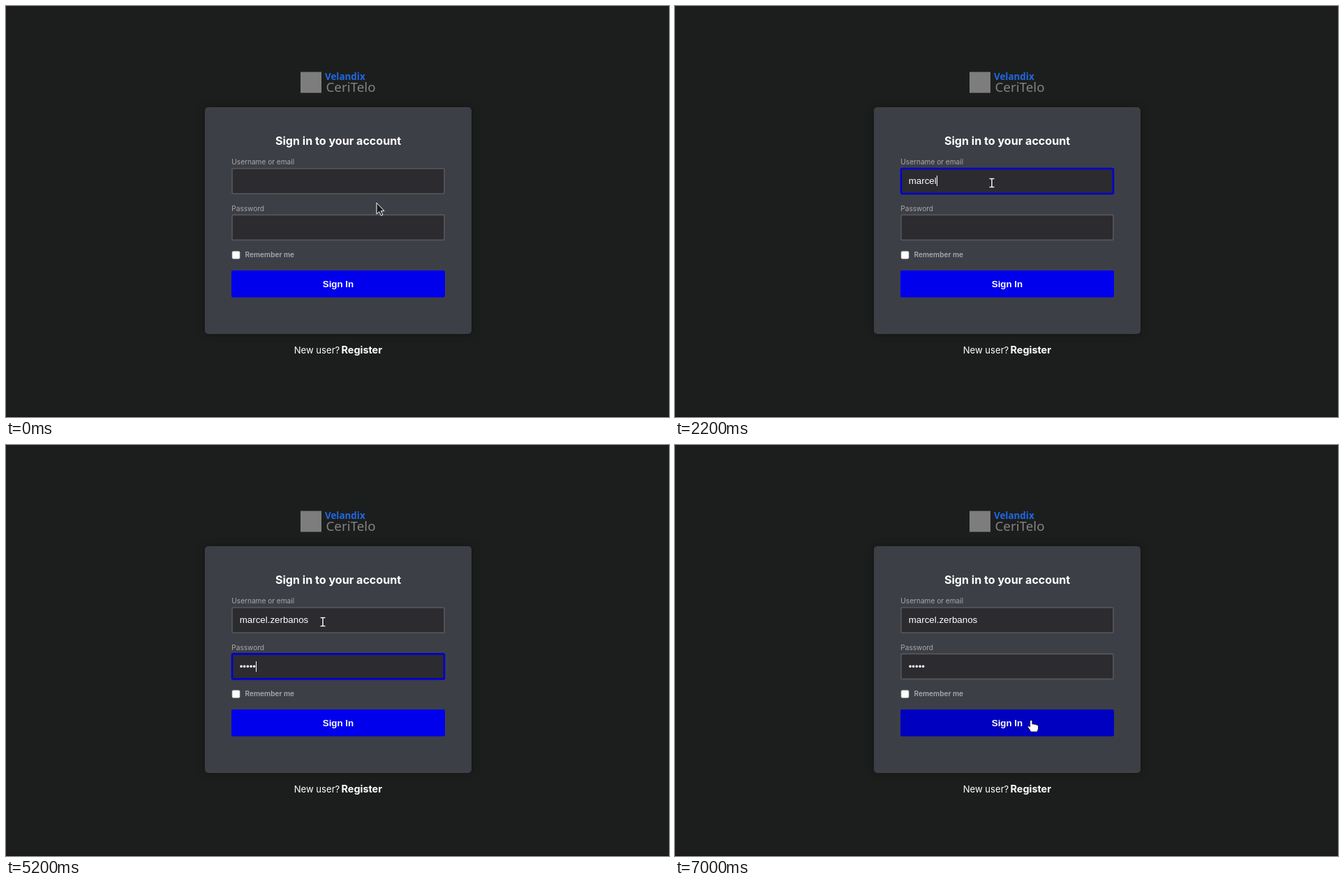
Write an HTML page that moves like this. It is 950 px wide and 589 px high and loops after 8000 ms.

```html
<!DOCTYPE html>
<html lang="en">
<head>
<meta charset="utf-8">
<title>Sign in</title>
<style>
  html, body { margin: 0; width: 100%; height: 100%; overflow: hidden; background: #1c1e1d; }
  svg { display: block; }
  text { font-family: Inter, sans-serif; fill: #fff; white-space: pre; }
  .label { font-size: 10.1px; fill: #a9a9ab; }
  .value, .button { font-family: "Liberation Sans", Arial, sans-serif; font-size: 13.333px; }
  .brand { font-family: "Noto Sans", sans-serif; }
  .bold { font-weight: 700; }
  .field { fill: #2b2b30; stroke: #58585a; stroke-width: 1.6; }
  .field.focus { stroke: #0000d2; stroke-width: 2.6; }
  .card { filter: drop-shadow(0 0 6px rgba(0, 0, 0, .28)); }
</style>
</head>
<body>
<svg width="950" height="589" viewBox="0 0 950 589">
  <rect width="950" height="589" fill="#1c1e1d"/>
  <rect y="588" width="950" height="1" fill="#121313"/>

  <rect x="422" y="94.5" width="30" height="30" fill="#7d7d7d"/>
  <text class="brand bold" x="457" y="106" font-size="13.4" style="fill:#1f68e4">Velandix</text>
  <text class="brand" x="458.5" y="122.8" font-size="18.8" style="fill:#828282">CeriTelo</text>

  <rect class="card" x="285" y="145" width="382" height="325" rx="5" fill="#3d3f46"/>
  <text class="bold" x="476" y="198.5" font-size="16.1" text-anchor="middle">Sign in to your account</text>

  <text class="label" x="323.3" y="227">Username or email</text>
  <rect class="field" id="userBox" x="324" y="233" width="304" height="36" rx="1.5"/>
  <text class="value" id="user" x="334.7" y="255.3"></text>

  <text class="label" x="323.3" y="293.6">Password</text>
  <rect class="field" id="passBox" x="324" y="299.4" width="304" height="36" rx="1.5"/>
  <text class="value" id="pass" x="334.7" y="321.8"></text>

  <rect id="caret" width="1" height="15" fill="#fff"/>

  <rect x="323.9" y="351.3" width="11.3" height="11.3" rx="2" fill="#fff" stroke="#767676" stroke-width=".6"/>
  <text class="label" x="342.6" y="360.3" style="font-weight:600;font-size:10.1px">Remember me</text>

  <rect id="button" x="323" y="379" width="306" height="38.5" rx="2"/>
  <text class="button bold" x="476" y="403" text-anchor="middle">Sign In</text>

  <text x="412.7" y="497.6" font-size="13.1">New user?</text>
  <text class="bold" x="480.6" y="497.6" font-size="14.4">Register</text>

  <!-- pointers, each drawn around its hot spot -->
  <g id="arrow">
    <path d="M0 0V16.2L3.8 12.8L6.4 18.4L8.9 17.3L6.4 11.7H11Z" fill="#1b1b1d" stroke="#fff"/>
  </g>
  <g id="beam" fill="none">
    <path id="stem" d="M-3.5 -6H3.5M0 -6V6M-3.5 6H3.5"/>
    <use href="#stem" stroke="#111" stroke-width="3.2"/>
    <use href="#stem" stroke="#fff" stroke-width="1.5"/>
  </g>
  <g id="hand">
    <path d="M-1.6 .8Q0 -.8 1.6 .8V5.6Q3.2 4.6 4.8 6Q6.3 5.2 7.6 6.7Q10 6.2 10.2 8.5V12.5L8.7 16.5H-.4L-2.4 13L-4.8 9.7Q-4.8 7.7 -2.8 8.4L-1.6 9.5Z"
      fill="#fff" stroke="#15152a" stroke-width=".8" stroke-linejoin="round"/>
  </g>
</svg>
<script>
const LOOP = 8000;
const NAME = 'marcel.zerbanos';
const $ = id => document.getElementById(id);

// Steps: time in ms, then the values that hold from there on.
const pointer = [
  [0, 'arrow', 531, 282], [100, 'arrow', 528, 281.5], [400, 'arrow', 520, 277],
  [500, 'beam', 495, 266], [600, 'beam', 469, 257], [700, 'beam', 454, 253.5],
  [5800, 'beam', 466, 260], [5900, 'arrow', 494, 286], [6000, 'beam', 519, 322],
  [6100, 'arrow', 530, 358], [6400, 'arrow', 527, 377], [6500, 'hand', 524, 383],
  [6600, 'hand', 519, 389], [6700, 'hand', 515, 393], [6800, 'hand', 514, 394],
  [7000, 'hand', 510.3, 394.5]
];
const typed = [
  [0, 0], [1700, 1], [1900, 3], [2100, 5], [2200, 6], [2500, 7], [2700, 8], [2800, 9],
  [3000, 10], [3700, 12], [3900, 13], [4000, 14], [4100, 15]
];
const dots = [[0, 0], [4700, 1], [4800, 2], [4900, 3], [5100, 4], [5200, 5]];
const focus = [[0, ''], [800, 'user'], [4600, 'pass'], [6800, '']];
const caretOn = [[0, false], [800, true], [1400, false], [1700, true], [5800, false]];
const hover = [[0, false], [6400, true]];

const at = (steps, t) => steps.findLast(s => s[0] <= t).slice(1);

function draw(t) {
  const [kind, x, y] = at(pointer, t);
  for (const id of ['arrow', 'beam', 'hand']) {
    $(id).setAttribute('display', id === kind ? 'inline' : 'none');
  }
  $(kind).setAttribute('transform', `translate(${x} ${y})`);

  $('user').textContent = NAME.slice(0, at(typed, t)[0]);
  $('pass').textContent = '•'.repeat(at(dots, t)[0]);

  const [active] = at(focus, t);
  $('userBox').classList.toggle('focus', active === 'user');
  $('passBox').classList.toggle('focus', active === 'pass');
  $('button').setAttribute('fill', at(hover, t)[0] ? '#0000c0' : '#0000ec');

  const show = active && at(caretOn, t)[0];
  $('caret').setAttribute('display', show ? 'inline' : 'none');
  if (show) {
    const field = $(active);
    const width = field.textContent ? field.getComputedTextLength() : 0;
    $('caret').setAttribute('x', Math.round(334.7 + width));
    $('caret').setAttribute('y', active === 'user' ? 243 : 310);
  }
}

const start = performance.now();
function tick() {
  draw((performance.now() - start) % LOOP);
  requestAnimationFrame(tick);
}
tick();
</script>
</body>
</html>
```
